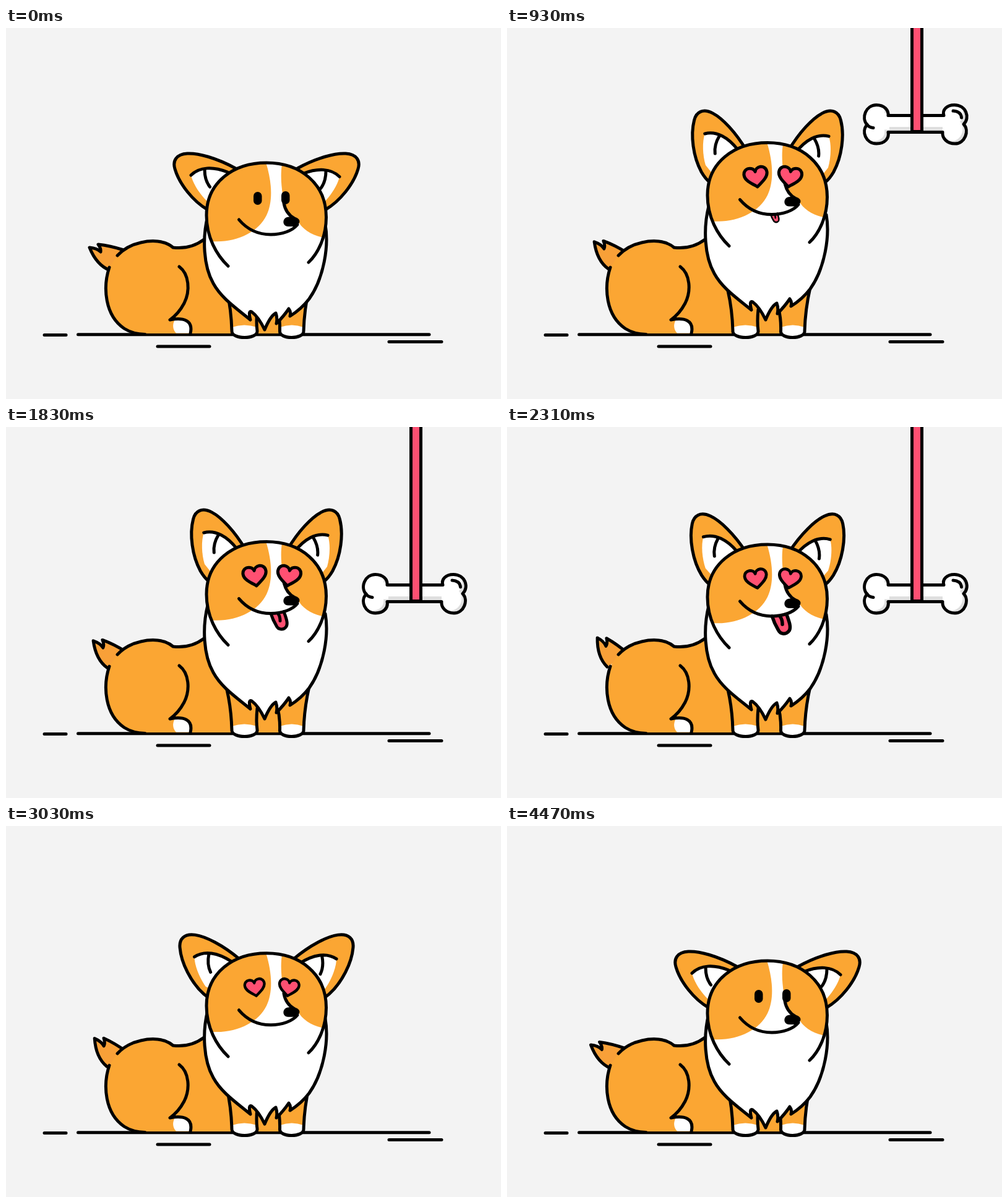
Animation, 800 px wide and 600 px high, one loop 4.5 s. Source, as an HTML page:

```html
<!DOCTYPE html>
<html lang="en">
<head>
<meta charset="utf-8">
<title>Corgi and bone</title>
<style>
  html, body { margin: 0; width: 100%; height: 100%; overflow: hidden; background: #f3f3f3; }
  svg { display: block; width: 100vw; height: 100vh; }
  .ln { fill: none; stroke: #000; stroke-width: 5; stroke-linecap: round; stroke-linejoin: round; }
  .or { fill: #fba633; }
  .tl { fill: #f8a038; }
  .wh { fill: #fff; }
  .gr { fill: #dfdfdf; }
  .ln.pk { fill: #ff5072; }
  .ln.wh { fill: #fff; }
</style>
</head>
<body>
<svg viewBox="0 0 800 600">
  <defs>
    <path id="headShape" d="M359 385C340 367 324 338 324 303C324 250 367 218 421 218C476 218 517.500 252 517.500 306C517.500 338 504 365 489 379"/>
    <clipPath id="headClip"><use href="#headShape"/></clipPath>
    <path id="boneShape" d="M616 141.500H706C703 132 711 124.500 723 124.500C742 124.500 749 145 738 155.500C748 166 740 187 724 187C711 187 703 178 704 168.500H616C618 178 611 187 597 187C580 187 572 167 582 156.500C572 145 580 124.500 597 124.500C610 124.500 617 133 616 141.500Z"/>
    <clipPath id="boneClip"><use href="#boneShape"/></clipPath>
    <path id="earShape" d="M371 227C340 210 310 202 293 203C275 204 269 215 273 228C280 252 302 280 326 294Q337 300 345 301"/>
    <g id="earInner">
      <path class="wh" d="M299 238C313 224 335 224 357 233L350 290L326 281C314 270 302 252 299 238Z"/>
      <path class="ln" d="M299 238C313 224 335 224 358 233M321 229Q321 246 329.500 257"/>
    </g>
    <path id="heart" class="ln pk" d="M0 15.500C-5 11-18.500 4-18.500-6C-18.500-12-14-15.500-9.500-15.500C-5-15.500-1-13 0-9C1-13 5-15.500 9.500-15.500C14-15.500 18.500-12 18.500-6C18.500 4 5 11 0 15.500Z"/>
  </defs>

  <path class="ln" d="M62 496.500H97M116.500 495.800H684M245 515H329M619 507.500H704"/>

  <g id="tail">
    <path class="ln tl" style="fill:#f8a038" d="M168 392C150 385 141 370 135 355Q147 356 153 362Q154 357 149 350Q168 352 190 359"/>
  </g>

  <path class="or" d="M167 387C156 420 160 465 191 486Q203 494 221 494H442V420L320 342C304 354 287 357 270 355C256 343 235 343 218 347Q195 352 180 368Z"/>
  <path class="wh" d="M273 472C268 480 270 489 275 493.500H299C301 478 294 470 273 472Z"/>
  <path class="ln" d="M167 387C156 420 160 465 191 486Q205 495 225 495.500M180 368Q195 352 218 347C235 343 256 343 270 355C287 357 304 354 320 342"/>
  <path class="ln" d="M280 386C296 398 298 425 288 445Q279 462 265 472C286 468 303 472 298 494"/>

  <g id="legs">
    <path class="or" d="M357 425Q364 455 365 488H406V420ZM440 440Q442 465 443 488H481Q482 455 490 420Z"/>
    <path class="wh" d="M365 484Q385 477 406 484V490C407 504 364 504 365 490ZM442.500 484Q462 477 481 484V490C482 504 441 504 442.500 490Z"/>
    <path class="ln" d="M357 425Q364 455 365 490C364 504 407 504 406 490Q404 475 406 455M439 455Q443 470 442.500 490C441 504 482 504 481 490Q482 455 490 420"/>
  </g>

  <g id="chest">
    <path class="ln wh" d="M326 304C317 340 319 385 335 413C348 437 372 453 395 472Q391 456 397 459Q408 467 418 488Q427 466 436 461Q439 469 437 478Q449 466 457 454Q461 459 459 466Q478 454 490 438C514 404 522 352 516 318"/>
  </g>

  <g id="head">
    <g id="earL">
      <use href="#earShape" class="or"/>
      <use href="#earInner"/>
      <use href="#earShape" class="ln"/>
    </g>
    <g transform="translate(842 0) scale(-1 1)">
      <g id="earR">
        <use href="#earShape" class="or"/>
        <use href="#earInner" x="4" y="2.500"/>
        <use href="#earShape" class="ln"/>
      </g>
    </g>
    <use href="#headShape" class="wh"/>
    <g clip-path="url(#headClip)" class="or">
      <path d="M419 214C430 248 432 280 421 303C408 330 372 348 332 345H310V205Z"/>
      <path d="M447 214C442 240 446 265 450 285C453 300 462 306 472 312C478 325 495 336 514 339H530V205Z"/>
    </g>
    <use href="#headShape" class="ln"/>
    <g id="dots">
      <rect x="400" y="265" width="13.500" height="21" rx="6.700"/>
      <rect x="445" y="264" width="13.500" height="21" rx="6.700"/>
    </g>
    <path class="ln" d="M449 283Q452 300 466 308"/>
    <g id="tongue">
      <path class="ln pk" d="M428 334C431 344 434 349 437 354C440 361 449 361 453 355C456 350 453 342 449 331"/>
      <path class="ln" d="M440 335Q443 339 443 346"/>
    </g>
    <path class="ln" d="M376.500 310C390 326 408 334 428 334C446 334 463 328 471 318"/>
    <path d="M457 305.500C464 303.500 474.500 307 474.500 312.500C474.500 318 468 321.500 463 321H456C445.500 320.500 446 306 457 305.500Z"/>
    <g id="hearts">
      <use id="heartL" href="#heart"/>
      <use id="heartR" href="#heart"/>
    </g>
  </g>

  <g id="bone">
    <use href="#boneShape" class="gr"/>
    <g clip-path="url(#boneClip)">
      <use href="#boneShape" class="wh" x="-6" y="-4"/>
      <path class="gr" d="M618 160H704V168H618Z"/>
    </g>
    <use href="#boneShape" class="ln"/>
    <path class="ln" d="M582 156Q585 161 592 161.500M721 134Q734 135 734.500 145"/>
    <path class="ln pk" d="M654.500 -400V167.500H670.500V-400"/>
  </g>
</svg>
<script>
  const LOOP = 4500, BEAT = 300;
  const $ = id => document.getElementById(id);
  const move = (id, value) => $(id).setAttribute('transform', value);
  const show = (id, on) => $(id).setAttribute('visibility', on ? 'visible' : 'hidden');

  // Sine ease from 0 to 1 between times a and b
  const ramp = (t, a, b) => (1 - Math.cos(Math.PI * Math.min(1, Math.max(0, (t - a) / (b - a))))) / 2;
  const pulse = (t, a, b, c, d) => ramp(t, a, b) - ramp(t, c, d);

  function draw(t) {
    const beat = (1 - Math.cos(2 * Math.PI * t / BEAT)) / 2;
    const pant = t >= 900 && t < 2700 ? beat : 0;
    const joy = pulse(t, 540, 900, 2750, 3230);

    move('head', `translate(0 ${-33.3 * joy + 8.1 * pant})`);
    move('chest', `translate(0 ${-16.2 * joy + 2 * pant})`);

    const perk = 12 * pulse(t, 3840, 3990, 4080, 4260);
    const ear = 31.3 * joy - 4.6 * pant + perk;
    move('earL', `rotate(${ear} 372 258.4)`);
    move('earR', `rotate(${ear} 372 258.4)`);

    const lift = 12.5 * pulse(t, 600, 900, 3030, 3260) + 4 * pulse(t, 2850, 3030, 3030, 3260);
    move('tail', `rotate(${lift + (15 + 1.5 * joy) * beat} 175 375)`);

    const lick = pulse(t, 880, 980, 2700, 2900);
    show('tongue', lick > 0.02);
    move('tongue', `translate(424 333) scale(${lick * (0.98 + 0.2 * pant)}) translate(-424 -333)`);

    const love = t > 640 && t < 3150;
    const size = (0.25 + 0.77 * pulse(t, 640, 840, 2980, 3150)) * (1 - 0.1 * pant);
    show('dots', !love);
    show('hearts', love);
    move('heartL', `translate(402.500 273.800) rotate(-9) scale(${size})`);
    move('heartR', `translate(457 273.800) rotate(9) scale(${size})`);

    const drop = -205 + 141 * ramp(t, 30, 540) + 178 * ramp(t, 550, 1480) - 345 * ramp(t, 2600, 3000);
    move('bone', `translate(0 ${drop})`);
  }

  const start = performance.now();
  function tick() {
    draw((performance.now() - start) % LOOP);
    requestAnimationFrame(tick);
  }
  tick();
</script>
</body>
</html>
```
